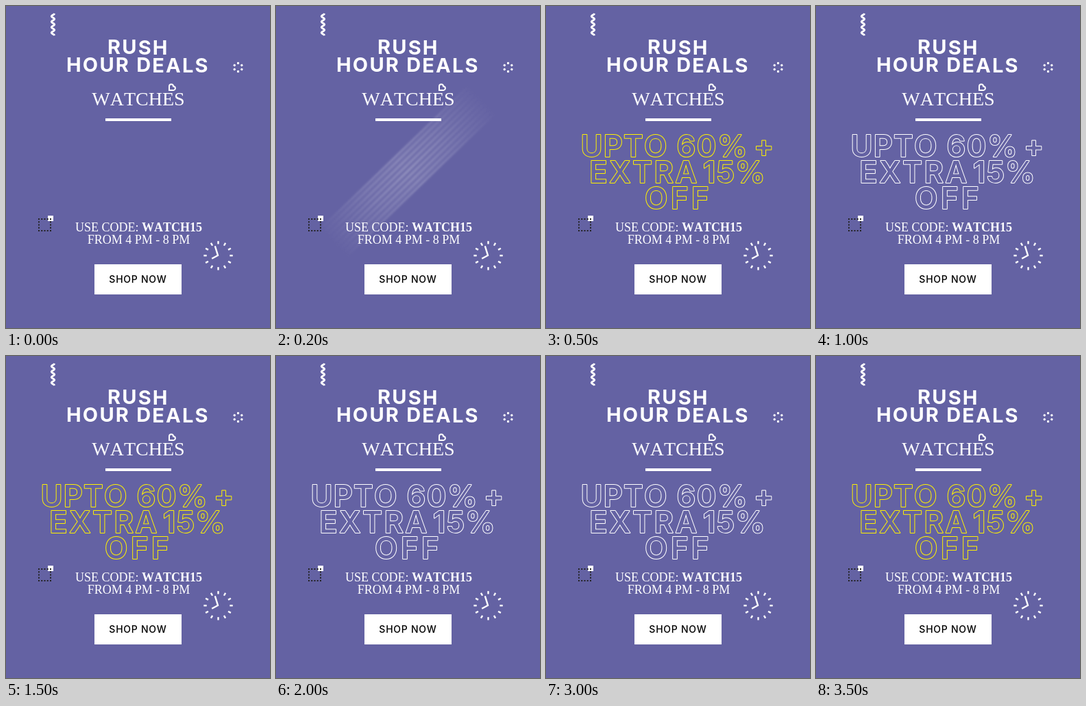
An HTML page that plays this animation: 385x470 px, repeating every 5500 ms.

```html
<!DOCTYPE html>
<html lang="en">
<head>
<meta charset="utf-8">
<title>Rush hour deals</title>
<style>
  html, body { margin: 0; width: 100%; height: 100%; overflow: hidden; background: #6462a3; }
  svg { display: block; width: 385px; height: 470px; }
  text { font-kerning: none; white-space: pre; }
  .title { font: 700 29px Inter, sans-serif; letter-spacing: 2.2px; }
  .serif { font-family: "Liberation Serif", serif; }
  .mid { text-anchor: middle; }
  .line { fill: none; stroke: #fff; }
  .offer { font: 600 43.5px Inter, sans-serif; }
  #offer { fill: #6462a3; stroke: #fff200; stroke-width: 2; paint-order: stroke; stroke-linejoin: round; }
  .ghost { fill: none; stroke: #fff; stroke-width: 1.4; }
  .step { opacity: 0; }
</style>
</head>
<body>
<svg id="stage" viewBox="0 0 385 470" fill="#fff">
  <defs>
    <linearGradient id="fade" gradientUnits="userSpaceOnUse" x1="-152" y1="0" x2="152" y2="0">
      <stop offset="0" stop-color="#fff" stop-opacity="0"/>
      <stop offset=".3" stop-color="#fff" stop-opacity=".7"/>
      <stop offset=".5" stop-color="#fff"/>
      <stop offset=".7" stop-color="#fff" stop-opacity=".7"/>
      <stop offset="1" stop-color="#fff" stop-opacity="0"/>
    </linearGradient>
    <filter id="soft" filterUnits="userSpaceOnUse" x="-200" y="-80" width="400" height="160">
      <feGaussianBlur stdDeviation="1.2"/>
    </filter>
    <g id="words" class="offer"></g>
  </defs>

  <g id="smears"></g>

  <text class="title" x="148" y="70">RU<tspan dy=".5">SH</tspan></text>
  <text class="title" x="88" y="96">HOUR D<tspan dy="1">EALS</tspan></text>
  <text class="serif mid" x="193" y="144.5" font-size="28">WATCHES</text>
  <rect x="145" y="164" width="96" height="4"/>

  <g id="offer" class="step"><use href="#words"/></g>

  <text class="serif mid" x="193.5" y="329" font-size="18">USE CODE: <tspan font-weight="700">WATCH15</tspan></text>
  <text class="serif mid" x="193.5" y="347" font-size="18">FROM 4 PM - 8 PM</text>

  <rect x="129" y="377" width="127" height="44"/>
  <text class="mid" x="192.5" y="404" fill="#000" font-family="Inter, sans-serif"
        font-size="14" font-weight="500" letter-spacing=".75">SHOP NOW</text>

  <path id="wave" class="line" stroke-width="2.8"/>
  <path class="line" stroke-width="2" d="M238 123V117.2a3 3 0 0 1 6 0a2.9 2.9 0 0 1 0 5.8z"/>
  <rect x="61" y="306" width="8" height="8"/>
  <rect x="48" y="311" width="17" height="17" fill="none" stroke="#222" stroke-width="2"
        stroke-dasharray="2 2.25" stroke-dashoffset="1"/>
  <g id="spark" class="line" stroke-width="3" transform="translate(338.5 89.5)"></g>
  <g id="clock" class="line" stroke-width="2.4" transform="translate(309.5 364.3)">
    <path d="M-4.7 -14L-.5 -.3L-9.3 4.4"/>
  </g>
</svg>
<script>
const LOOP = 5500;
const $ = id => document.getElementById(id);

function add(parent, tag, attrs, text) {
  const el = document.createElementNS("http://www.w3.org/2000/svg", tag);
  for (const key in attrs) el.setAttribute(key, attrs[key]);
  if (text) el.textContent = text;
  parent.append(el);
  return el;
}

// x, baseline, word, tracking
[
  [50.5, 219.5, "UPTO", 1.2], [190.5, 219.5, "60%", 1.5], [303, 219.5, "+", 0],
  [63.3, 257.5, "EXTRA", 2.6], [229, 257.5, "15%", 1], [144, 295.5, "OFF", 4.5]
].forEach(([x, y, word, gap]) => add($("words"), "text", { x, y, "letter-spacing": gap }, word));

// Decorations
let wave = "";
for (let y = 11; y <= 43; y += 0.5) {
  wave += (wave ? "L" : "M") + (68.5 + 2.2 * Math.cos((y - 11) * Math.PI / 4)).toFixed(2) + " " + y;
}
$("wave").setAttribute("d", wave);

function ticks(parent, count, inner, outer) {
  for (let i = 0; i < count; i++) {
    add(parent, "path", { d: `M0 ${-inner}V${-outer}`, transform: `rotate(${i * 360 / count})` });
  }
}
ticks($("spark"), 6, 4.6, 7.6);
ticks($("clock"), 12, 16.8, 21.2);

// Diagonal light streaks
function streaks(length, width, opacity) {
  const step = add($("smears"), "g", { class: "step" });
  const band = add(step, "g", {
    transform: `translate(192 241) rotate(-44) scale(${length} ${width})`,
    opacity, stroke: "url(#fade)", filter: "url(#soft)"
  });
  const bar = (y, w, alpha) => add(band, "path", {
    d: `M-152 ${y}L152 ${y + 0.01}`, "stroke-width": w, "stroke-opacity": alpha
  });
  bar(0, 58, 0.09);
  for (let i = -4; i <= 4; i++) bar(i * 6.9, 3.4, 0.2 - Math.abs(i) * 0.018);
  return step;
}

// Lettering smeared along the same diagonal
function smear(scale, length, copies, opacity) {
  const step = add($("smears"), "g", { class: "step" });
  for (let i = 0; i < copies; i++) {
    const u = i / (copies - 1) - 0.5;
    const shift = u * length * Math.SQRT1_2;
    add(step, "use", {
      href: "#words", class: "ghost", opacity: opacity * (1.3 - 2 * Math.abs(u)),
      transform: `translate(${192 + shift} ${241 - shift}) scale(${scale}) translate(-192 -241)`
    });
  }
  return step;
}

// Hard steps: [ms, value] pairs, repeated forever
function play(el, prop, steps) {
  const frames = steps.map(([ms, value]) => ({ offset: ms / LOOP, [prop]: value, easing: "step-end" }));
  frames.push({ offset: 1, [prop]: steps[steps.length - 1][1] });
  el.animate(frames, { duration: LOOP, iterations: Infinity }).startTime = 0 + start;
}

const start = document.timeline.currentTime || 0;

[
  streaks(1.08, 0.8, 0.45),
  streaks(1, 1, 1),
  smear(0.55, 130, 36, 0.07),
  smear(0.88, 36, 14, 0.16)
].forEach((el, i) => {
  const from = 100 + i * 100;
  play(el, "opacity", [[0, 0], [from, 1], [from + 100, 0]]);
});

play($("offer"), "opacity", [[0, 0], [500, 1]]);
play($("offer"), "stroke", [0, 1000, 1500, 2000, 2500, 3000, 3500]
  .map((ms, i) => [ms, i % 2 ? "#ffffff" : "#fff200"]));
</script>
</body>
</html>
```
